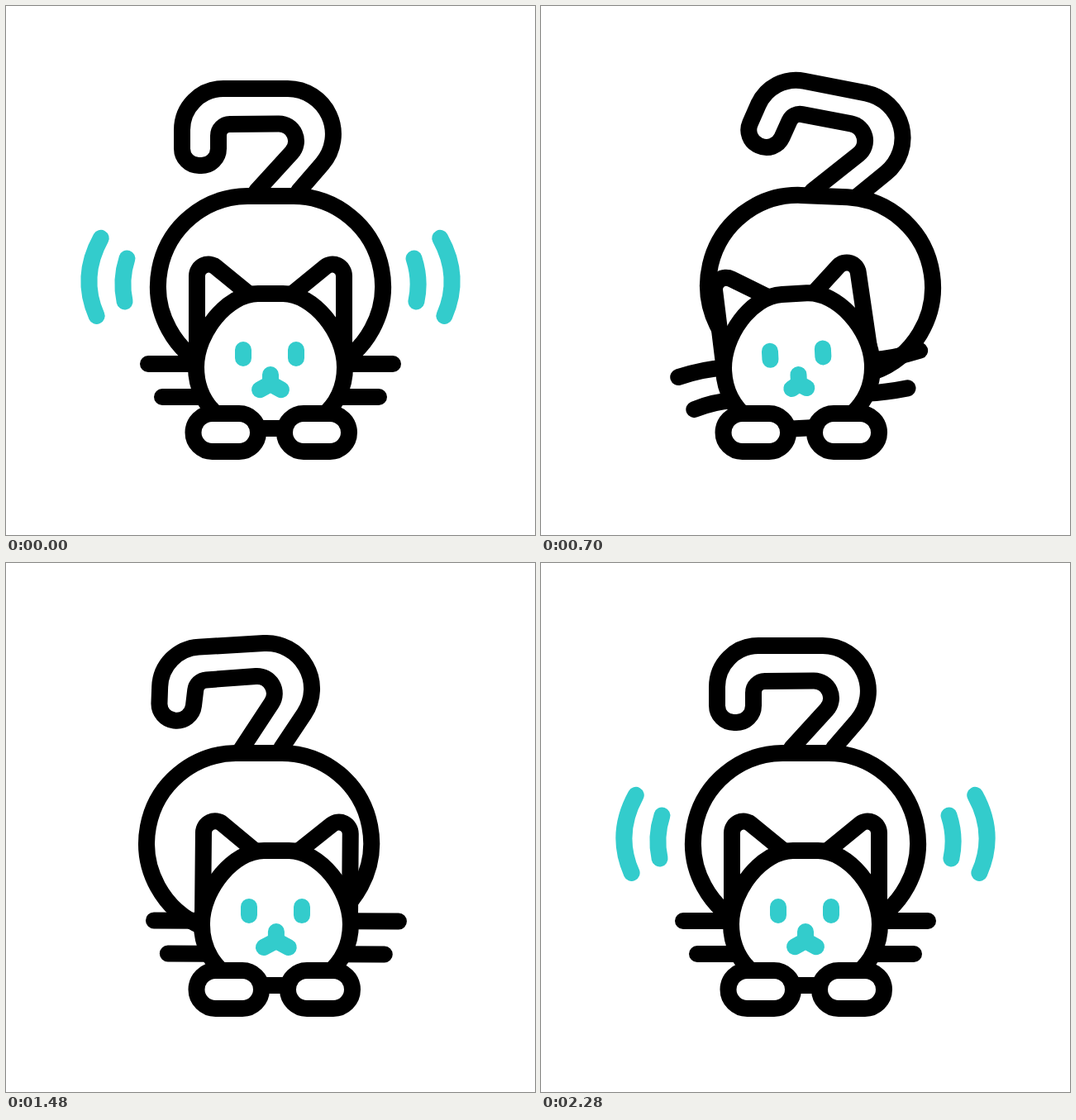
Write an HTML page that moves like this. It is 640 by 640 pixels and loops after 2500 ms.

```html
<!DOCTYPE html>
<html lang="en">
<head>
<meta charset="utf-8">
<title>Swaying cat</title>
<style>
  html, body { margin: 0; width: 100%; height: 100%; overflow: hidden; background: #fff; }
  svg { display: block; width: 100vw; height: 100vh; }
  .ink { fill: none; stroke: #000; stroke-width: 20; stroke-linecap: round; stroke-linejoin: round; }
  .ink .solid { fill: #fff; }
  .teal { fill: none; stroke: #33cccc; stroke-width: 20; stroke-linecap: round; stroke-linejoin: round; }
</style>
</head>
<body>
<svg viewBox="0 0 640 640">
  <g class="teal">
    <path id="outerL"/><path id="innerL"/>
    <g transform="translate(640 0) scale(-1 1)"><path id="outerR"/><path id="innerR"/></g>
  </g>
  <g class="ink">
    <path id="tail" class="solid"/>
    <path id="body" class="solid" d="M252 440A109 109 0 0 1 292 230H348A109 109 0 0 1 388 440"/>
  </g>
  <g id="head">
    <g class="ink">
      <path id="whiskers"/>
      <path id="earL" class="solid"/>
      <path id="earR" class="solid"/>
      <path class="solid" d="M305 348H335C372 348 410 395 410 437C410 462 399 483 382 497L365 511H275L258 497C241 483 230 462 230 437C230 395 268 348 305 348Z"/>
    </g>
    <path id="face" class="teal"/>
  </g>
  <g id="paws" class="ink">
    <rect class="solid" x="226.5" y="493" width="78.5" height="46" rx="23"/>
    <rect class="solid" x="337" y="493" width="78" height="46" rx="23"/>
  </g>
</svg>
<script>
const LOOP = 2500;
const el = id => document.getElementById(id);

// Corner points of the tail outline, relative to the body.
const rest  = [303, 224, 378, 142, 257, 143, 257, 193, 213, 193, 213, 100, 461, 100, 354, 224];
const lean  = [300, 224, 373, 138, 251, 146, 254, 195, 210, 198, 205, 104, 454, 94, 352, 223];
const left  = [295, 226, 353, 130, 239, 144, 235, 195, 195, 194, 194, 107, 429, 83, 344, 223];
const right = [310, 224, 402, 151, 287, 129, 265, 178, 227, 160, 261, 83, 490, 128, 365, 230];
const swing = [289, 224, 371, 125, 254, 141, 265, 190, 225, 200, 200, 103, 460, 75, 342, 223];
const tailRadii = [21, 14, 20.5, 20.5, 50, 55];

// Each key is [time, ...values].
const tailKeys = [
  [160, rest], [340, lean], [460, left], [610, swing], [700, right], [980, left],
  [1160, swing], [1260, right], [1540, left], [1720, swing], [1840, right], [2280, rest]
].map(([t, pose]) => [t, ...pose]);
const sway = [[700, -1], [980, 1], [1260, -1], [1540, 1]];
const bodyKeys = [[160, 0], [340, .64], [450, 1], ...sway, [1720, .17], [1840, -.3], [2280, 0]];
const headKeys = [[160, 0], [340, .66], [450, 1], ...sway, [1720, -.33], [1800, -.6], [2280, 0]];
const bendKeys = [[230, 0], [520, 1], [720, -1.02], [1000, 1.02], [1280, -1.02], [1670, 1.05], [1920, -.5], [2280, 0]];
const blinkKeys = [[220, 0], [340, 1], [460, 0], [1620, 0], [1720, .7], [1770, 1], [1880, 0]];
const mouthKeys = [[160, 13], [340, 10.5], [700, 9], [980, 14.5], [1260, 15.5], [1720, 14], [2280, 13]];

// Waves: distance from the edge, half height, opacity.
const outerOut = [[160, 100.5, 47, 1], [340, 64, 54, .12], [365, 63, 54, 0]];
const outerIn = [[1540, 155, 17, 0], [1590, 142, 24, 1], [1620, 135, 28, 1], [1720, 117, 37.5, 1], [1780, 108, 43, 1], [1900, 100.5, 47, 1]];
const innerOut = [[160, 141.5, 26, 1], [340, 96, 42.5, 1], [400, 80, 49, .7], [460, 66, 54, 0]];
const innerIn = [[1690, 156, 17, 0], [1720, 154.5, 17.5, .15], [1800, 148, 21, 1], [1900, 141.5, 26, 1]];
const delay = (keys, ms) => keys.map(([t, ...v]) => [t + ms, ...v]);
const waves = {
  outerL: [...outerOut, ...delay(outerIn, 100)],
  innerL: [...innerOut, ...delay(innerIn, 100)],
  outerR: [...outerOut, ...outerIn],
  innerR: [...innerOut, ...innerIn]
};

// Monotone cubic interpolation: rests at extremes, flows through the others.
function sample(keys, t) {
  const last = keys.length - 1;
  if (t <= keys[0][0]) return keys[0].slice(1);
  if (t >= keys[last][0]) return keys[last].slice(1);
  const i = keys.findIndex(k => k[0] > t) - 1;
  const [a, b] = [keys[i], keys[i + 1]];
  const span = b[0] - a[0], u = (t - a[0]) / span;
  const slope = (j, n) => (keys[j + 1][n] - keys[j][n]) / (keys[j + 1][0] - keys[j][0]);
  const tangent = (j, n) => {
    if (j === 0 || j === last) return 0;
    const p = slope(j - 1, n), q = slope(j, n);
    return p * q > 0 ? 2 * p * q / (p + q) : 0;
  };
  const s = u * u * (3 - 2 * u);
  return a.slice(1).map((v, k) => {
    const n = k + 1;
    return v + (b[n] - v) * s
      + span * u * (1 - u) * ((1 - u) * tangent(i, n) - u * tangent(i + 1, n));
  });
}

// Open polyline with a circular arc at every inner corner.
function rounded(p, radii) {
  let d = `M${p[0]} ${p[1]}`;
  radii.forEach((r, i) => {
    const [ax, ay, x, y, bx, by] = p.slice(2 * i, 2 * i + 6);
    const la = Math.hypot(ax - x, ay - y), lb = Math.hypot(bx - x, by - y);
    const ux = (ax - x) / la, uy = (ay - y) / la, vx = (bx - x) / lb, vy = (by - y) / lb;
    const cut = r / Math.tan(Math.acos(ux * vx + uy * vy) / 2);
    const sweep = ux * vy - uy * vx < 0 ? 1 : 0;
    d += `L${x + ux * cut} ${y + uy * cut}A${r} ${r} 0 0 ${sweep} ${x + vx * cut} ${y + vy * cut}`;
  });
  return d + `L${p.at(-2)} ${p.at(-1)}`;
}

function drawWave(id, t) {
  const [x, h, opacity] = sample(waves[id], t);
  const bow = (h - 17) * .39, cy = 333 - (h - 17) * .17, tilt = h * .055;
  el(id).setAttribute('d', `M${x + bow + tilt} ${cy - h}Q${x - bow} ${cy} ${x + bow - tilt} ${cy + h}`);
  el(id).setAttribute('opacity', opacity);
}

// side is -1 for the left ear, 1 for the right; lean is positive towards the middle.
function ear(side, lean) {
  const x = v => 320 + side * v;
  const tipX = 89 - lean * (lean > 0 ? 13.5 : 9);
  const tipY = 297 + 17 * Math.max(0, -lean);
  const rootX = 23 - lean * (lean > 0 ? 2 : 8);
  return rounded([x(89), 437, x(tipX), tipY, x(rootX), 351], [14]);
}

function whiskers(bend) {
  const curl = bend * Math.abs(bend);
  let d = '';
  for (const side of [-1, 1]) {
    const drop = side * curl;
    const tuck = 3 * Math.max(0, drop);
    const x = v => 320 + side * v;
    d += `M${x(88)} 433Q${x(115)} 433 ${x(148 - tuck)} ${433 + 9 * drop}`;
    d += `M${x(80)} 473Q${x(105)} 473 ${x(131 - tuck)} ${473 + (drop > 0 ? 9 : 4) * drop}`;
  }
  return d;
}

function face(blink, spread) {
  const lid = 416 + 9.99 * blink;
  const lip = 463 + (spread - 10) * .4;
  return `M287 426V${lid}M351 426V${lid}M320 446V457L${320 - spread} ${lip}M320 457L${320 + spread} ${lip}`;
}

function draw(t) {
  const [body] = sample(bodyKeys, t), [head] = sample(headKeys, t), [bend] = sample(bendKeys, t);
  const [blink] = sample(blinkKeys, t), [mouth] = sample(mouthKeys, t);
  Object.keys(waves).forEach(id => drawWave(id, t));

  el('tail').setAttribute('d', rounded(sample(tailKeys, t), tailRadii));
  el('tail').setAttribute('transform', `translate(${-18 * body} 0)`);
  el('body').setAttribute('transform', `translate(${-18 * body} 0) rotate(${-2.5 * bend} 320 340)`);

  el('head').setAttribute('transform', `translate(${9 * head} 0) rotate(${3.1 * bend} 320 437)`);
  el('whiskers').setAttribute('d', whiskers(bend));
  el('earL').setAttribute('d', ear(-1, bend));
  el('earR').setAttribute('d', ear(1, -bend));
  el('face').setAttribute('d', face(blink, mouth));
  el('paws').setAttribute('transform', `translate(${6 * (.85 * head + .15 * bend)} 0)`);
}

const start = performance.now();
function tick() {
  draw((performance.now() - start) % LOOP);
  requestAnimationFrame(tick);
}
tick();
</script>
</body>
</html>
```
